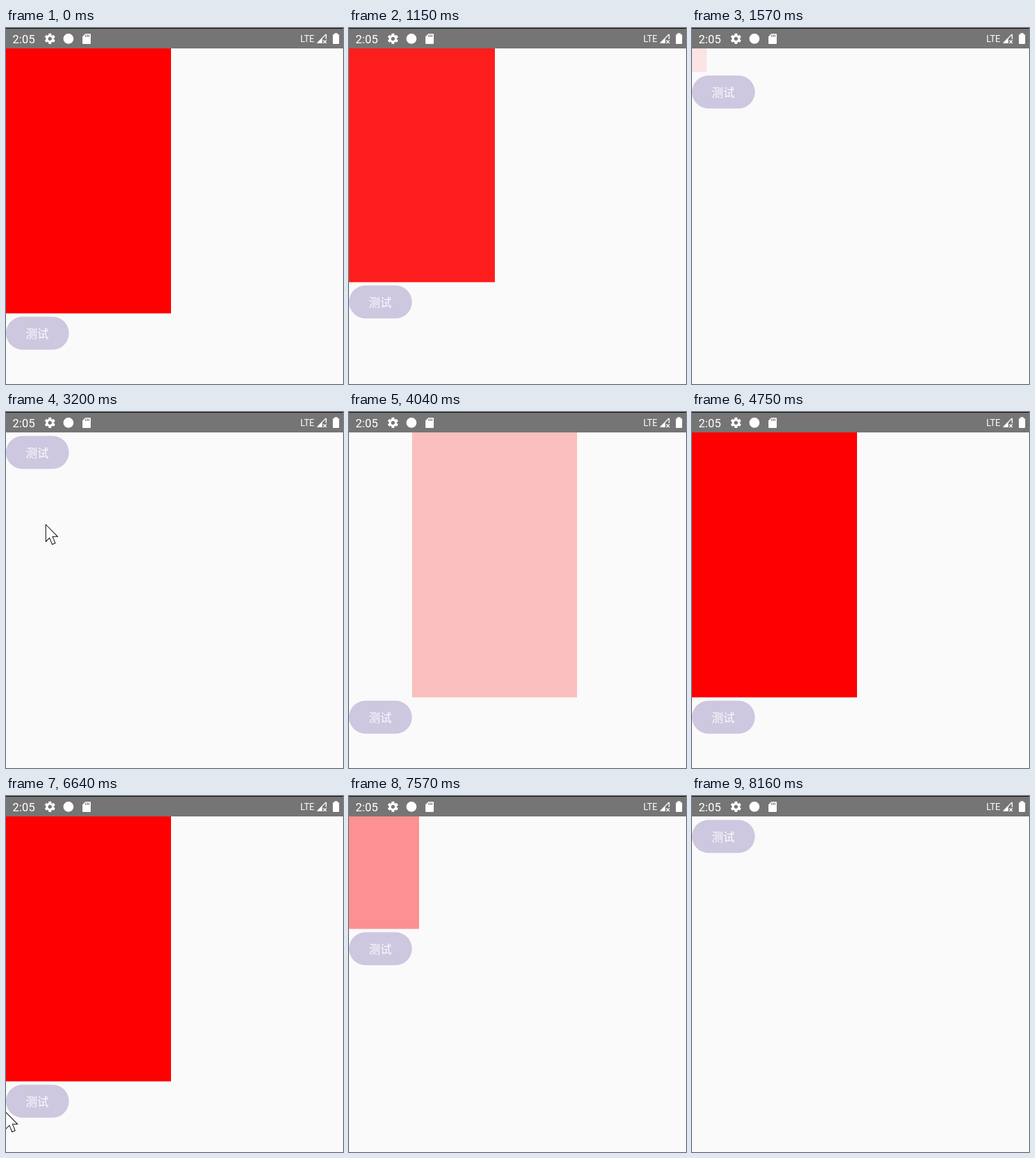
Write an HTML page with a canvas that moves like this. It is 529 px wide and 558 px high and loops after 9.02 s.

```html
<!DOCTYPE html>
<html lang="zh">
<head>
<meta charset="utf-8">
<title>Visibility animation</title>
<style>
  html, body { margin: 0; width: 100%; height: 100%; overflow: hidden; background: #fafafa; }
  canvas { display: block; }
</style>
</head>
<body>
<canvas id="stage" width="529" height="558"></canvas>
<script>
const ctx = document.getElementById('stage').getContext('2d');
const W = 529, H = 558, LOOP = 9020;
const BAR = 32, BOX_W = 259, BOX_H = 415.3, GAP = 5.5;
const PAGE = '#fafafa', GREY = '#757575', WHITE = '#fff';

// A tween starts at `at`, refreshes every TICK in phase with `sync`, and settles after SETTLE.
const TWEEN = 1000, SETTLE = 960, TICK = 46;
const HIDE_1 = { at: 920, sync: 1570 };
const SHOW = { at: 3790, sync: 4040 };
const HIDE_2 = { at: 7188, sync: 7570 };

// The pointer glides in to the button, clicks it and darts off.
const LEAVE = 210;
const VISITS = [
  { enter: 380, arrive: 690, click: 920, from: [85, 526], to: [69, 487], off: [82, 558] },
  { enter: 3020, arrive: 3490, click: 3770, from: [115, 366], to: [29, 61], off: [160, 507] },
  { enter: 6640, arrive: 6900, click: 7100, from: [-2, 495], to: [89, 466], off: [75, 557] }
];

const lerp = (a, b, k) => a + (b - a) * k;

// cubic-bezier(0.4, 0, 0.2, 1)
function ease(x) {
  if (x <= 0) return 0;
  if (x >= 1) return 1;
  let lo = 0, hi = 1;
  for (let i = 0; i < 24; i++) {
    const s = (lo + hi) / 2, r = 1 - s;
    if (1.2 * s * r * r + 0.6 * s * s * r + s * s * s < x) lo = s; else hi = s;
  }
  return lo * lo * (3 - 2 * lo);
}

function progress(t, { at, sync }) {
  if (t >= at + SETTLE) return 1;
  const shown = sync + Math.floor((t - sync) / TICK) * TICK;
  return ease((shown - at) / TWEEN);
}

function rect(x, y, w, h, color) {
  ctx.fillStyle = color;
  ctx.fillRect(x, y, w, h);
}

function pill(x, y, w, h, r, color) {
  ctx.beginPath();
  ctx.roundRect(x, y, w, h, r);
  ctx.fillStyle = color;
  ctx.fill();
}

function disc(x, y, r, color) {
  pill(x - r, y - r, 2 * r, 2 * r, r, color);
}

// Right triangle with its square corner at (x, y).
function corner(x, y, dx, dy, color) {
  ctx.beginPath();
  ctx.moveTo(x, y);
  ctx.lineTo(x + dx, y);
  ctx.lineTo(x, y + dy);
  ctx.fillStyle = color;
  ctx.fill();
}

function line(x, y, dx, dy) {
  ctx.beginPath();
  ctx.moveTo(x, y);
  ctx.lineTo(x + dx, y + dy);
  ctx.stroke();
}

function text(str, x, y, font, color, align = 'left') {
  ctx.font = font;
  ctx.textAlign = align;
  ctx.fillStyle = color;
  ctx.fillText(str, x, y);
}

function gear(x, y) {
  ctx.save();
  ctx.translate(x, y);
  for (let i = 0; i < 6; i++) {
    rect(-2.2, -8.2, 4.4, 4, WHITE);
    ctx.rotate(Math.PI / 3);
  }
  disc(0, 0, 6.2, WHITE);
  disc(0, 0, 2.9, GREY);
  ctx.restore();
}

function card(x, y) {
  pill(x, y, 13, 16, 1.2, WHITE);
  corner(x, y, 4.5, 4.5, GREY);
  for (let i = 0; i < 3; i++) rect(x + 4.5 + i * 2.5, y + 1.5, 1.3, 3.5, GREY);
}

function signal(x, y) {
  corner(x + 8.5, y, -8.5, -8.5, WHITE);
  ctx.strokeStyle = WHITE;
  ctx.lineWidth = 1.5;
  line(x + 1, y - 0.7, 13.5, -13.5);
  line(x + 14.5, y - 14, 0, 7.5);
  line(x + 10.2, y - 4.8, 4.8, 4.8);
  line(x + 10.2, y, 4.8, -4.8);
}

function battery(x, y) {
  rect(x + 2.5, y, 5, 3, WHITE);
  pill(x, y + 2, 10, 15, 1.2, WHITE);
}

function statusBar() {
  rect(0, 0, W, BAR, GREY);
  rect(0, 0, W, 1, '#000');
  text('2:05', 10.3, 24, '18.2px Roboto, sans-serif', WHITE);
  gear(69, 16.8);
  disc(98, 16.8, 8, WHITE);
  card(120, 9);
  text('LTE', 462, 22, '14px Roboto, sans-serif', WHITE);
  signal(488, 24);
  battery(513, 8);
}

function redBox(x, w, h, alpha) {
  ctx.globalAlpha = alpha;
  rect(x, BAR, w, h, '#f00');
  ctx.globalAlpha = 1;
}

function button(y) {
  pill(0, y, 98.8, 51.8, 25.9, '#cdc7e0');
  text('测试', 49, Math.round(y + 33), '18px "Noto Sans CJK SC", "Noto Sans CJK", sans-serif', '#fdfcfe', 'center');
}

// Arrow mirrored about its axis, which leans 22.5 degrees.
function arrow(x, y) {
  const half = [[0, 0], [10, 24.5], [2.6, 21.5], [2.6, 32.5]];
  const mirror = half.map(([u, v]) => [-u, v]).reverse();
  ctx.save();
  ctx.translate(x, y);
  ctx.rotate(-Math.PI / 8);
  ctx.beginPath();
  for (const [u, v] of [...half, ...mirror]) ctx.lineTo(u, v);
  ctx.closePath();
  ctx.fillStyle = WHITE;
  ctx.fill();
  ctx.strokeStyle = '#000';
  ctx.lineWidth = 1;
  ctx.stroke();
  ctx.restore();
}

function pointer(t) {
  const visit = VISITS.find(v => t >= v.enter && t < v.click + LEAVE);
  if (!visit) return;
  const { enter, arrive, click, from, to, off } = visit;
  const near = Math.min(1, (t - enter) / (arrive - enter));
  const away = Math.max(0, (t - click) / LEAVE);
  const [x, y] = to.map((p, i) => lerp(lerp(from[i], p, 1 - (1 - near) ** 2), off[i], away ** 2));
  arrow(Math.round(x) + 0.5, Math.round(y) + 0.5);
}

function draw(t) {
  let x = 0, size = 1, alpha = 1;
  if (t >= SHOW.at && t < HIDE_2.at) {
    alpha = progress(t, SHOW);
    x = Math.round(BOX_W / 2 * (1 - alpha));
  } else {
    size = alpha = 1 - progress(t, t < SHOW.at ? HIDE_1 : HIDE_2);
  }
  const h = BOX_H * size;
  rect(0, 0, W, H, PAGE);
  redBox(x, Math.round(BOX_W * size), h, alpha);
  button(BAR + Math.round(h) + GAP);
  statusBar();
  pointer(t);
}

const start = performance.now();
function tick() {
  draw((performance.now() - start) % LOOP);
  requestAnimationFrame(tick);
}
tick();
</script>
</body>
</html>
```
